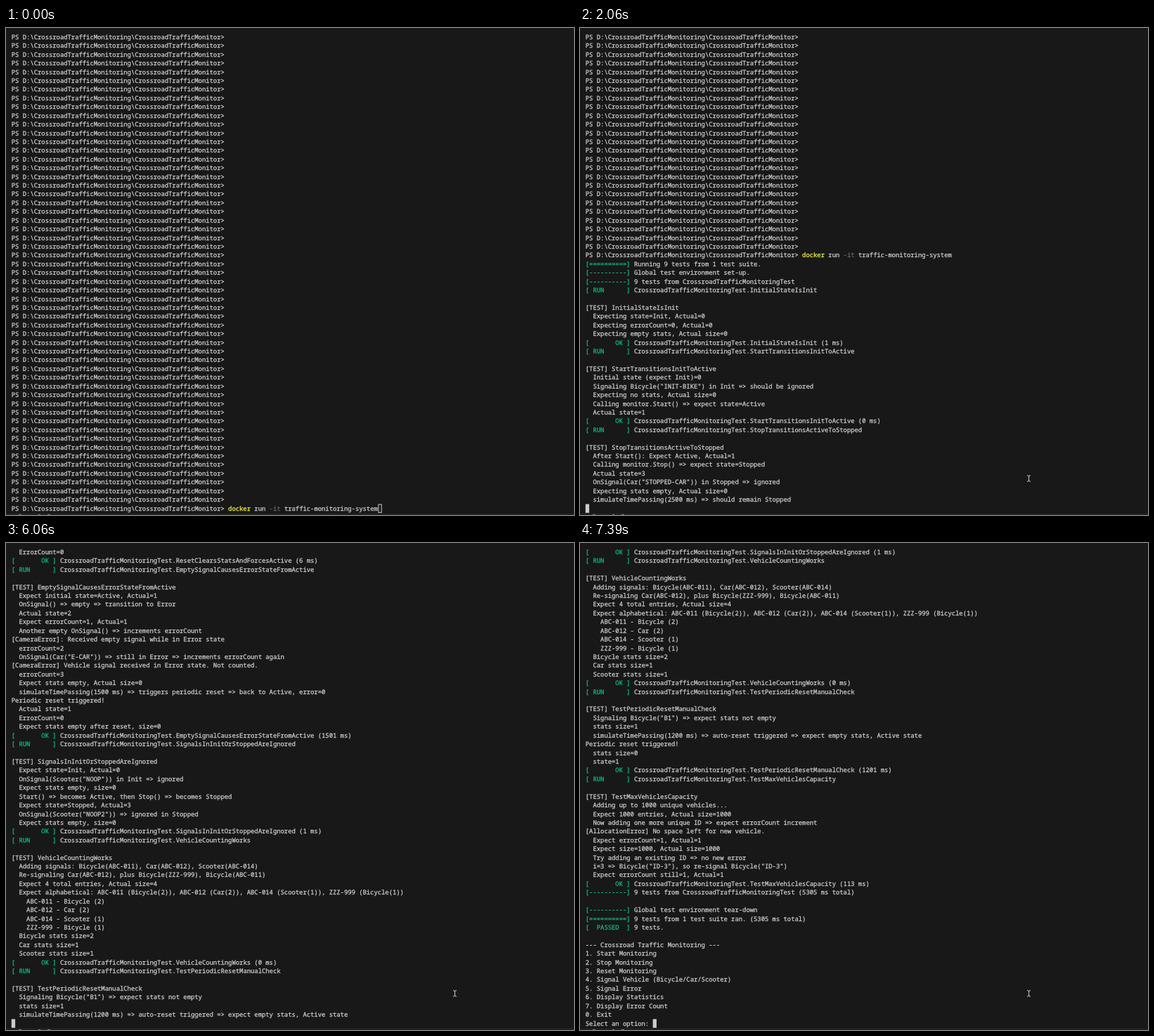
An HTML page that plays this animation: 808 px wide and 693 px high, repeating every 8000 ms.

```html
<!DOCTYPE html>
<html lang="en">
<head>
<meta charset="utf-8">
<title>Terminal session</title>
<style>
html, body { margin: 0; width: 100%; height: 100%; overflow: hidden; background: #181818; }
svg { display: block; }
text {
  font: 8.87px "Noto Sans Mono", "DejaVu Sans Mono", monospace;
  font-variant-ligatures: none;
  white-space: pre;
  text-rendering: geometricPrecision;
}
tspan { fill: currentColor; stroke: currentColor; stroke-width: .28px; }
</style>
</head>
<body>
<svg id="stage" width="808" height="693" viewBox="0 0 808 693">
  <rect width="808" height="693" fill="#181818"/>
  <g id="screen"></g>
  <rect id="cursor"/>
  <path id="mouse" d="M-2 -4H0M1 -4H3M.5 -4V4M-2 4H0M1 4H3" fill="none" stroke="#ccc"/>
  <rect y="691" width="808" height="1" fill="#2b2b2b"/>
  <path d="M18 692.5h4M46 692.5h3M59 692.5h4" stroke="#777"/>
</svg>
<script>
const LOOP = 8000, ROWS = 55, LEFT = 7.8, TOP = 6.8, CHAR = 5.322, LINE = 12.42;
const GREEN = '#0dbc79', YELLOW = '#f5f543', GRAY = '#666', PLAIN = '#ccc';

const prompt = 'PS D:\\CrossroadTrafficMonitoring\\CrossroadTrafficMonitor>';
const command = prompt + ' docker run -it traffic-monitoring-system';
const suite = 'CrossroadTrafficMonitoringTest';

// "@RUN name" and "@OK name" expand to test runner status lines.
const log = `[==========] Running 9 tests from 1 test suite.
[----------] Global test environment set-up.
[----------] 9 tests from ${suite}
@RUN InitialStateIsInit

[TEST] InitialStateIsInit
  Expecting state=Init, Actual=0
  Expecting errorCount=0, Actual=0
  Expecting empty stats, Actual size=0
@OK InitialStateIsInit (1 ms)
@RUN StartTransitionsInitToActive

[TEST] StartTransitionsInitToActive
  Initial state (expect Init)=0
  Signaling Bicycle("INIT-BIKE") in Init => should be ignored
  Expecting no stats, Actual size=0
  Calling monitor.Start() => expect state=Active
  Actual state=1
@OK StartTransitionsInitToActive (0 ms)
@RUN StopTransitionsActiveToStopped

[TEST] StopTransitionsActiveToStopped
  After Start(): Expect Active, Actual=1
  Calling monitor.Stop() => expect state=Stopped
  Actual state=3
  OnSignal(Car("STOPPED-CAR")) in Stopped => ignored
  Expecting stats empty, Actual size=0
  simulateTimePassing(2500 ms) => should remain Stopped
  Actual state=3
@OK StopTransitionsActiveToStopped (2482 ms)
@RUN ResetClearsStatsAndForcesActive

[TEST] ResetClearsStatsAndForcesActive
  Signaling vehicles...
  Expect state=Active, Actual=1
  Stats before Reset, size=2 (expect >0)
  Calling monitor.Reset() => expect state=Active, empty stats, errorCount=0
  Actual state=1
  Stats after Reset, size=0
  ErrorCount=0
@OK ResetClearsStatsAndForcesActive (6 ms)
@RUN EmptySignalCausesErrorStateFromActive

[TEST] EmptySignalCausesErrorStateFromActive
  Expect initial state=Active, Actual=1
  OnSignal() => empty => transition to Error
  Actual state=2
  Expect errorCount=1, Actual=1
  Another empty OnSignal() => increments errorCount
[CameraError]: Received empty signal while in Error state
  errorCount=2
  OnSignal(Car("E-CAR")) => still in Error => increments errorCount again
[CameraError] Vehicle signal received in Error state. Not counted.
  errorCount=3
  Expect stats empty, Actual size=0
  simulateTimePassing(1500 ms) => triggers periodic reset => back to Active, error=0
Periodic reset triggered!
  Actual state=1
  ErrorCount=0
  Expect stats empty after reset, size=0
@OK EmptySignalCausesErrorStateFromActive (1501 ms)
@RUN SignalsInInitOrStoppedAreIgnored

[TEST] SignalsInInitOrStoppedAreIgnored
  Expect state=Init, Actual=0
  OnSignal(Scooter("NOOP")) in Init => ignored
  Expect stats empty, size=0
  Start() => becomes Active, then Stop() => becomes Stopped
  Expect state=Stopped, Actual=3
  OnSignal(Scooter("NOOP2")) => ignored in Stopped
  Expect stats empty, size=0
@OK SignalsInInitOrStoppedAreIgnored (1 ms)
@RUN VehicleCountingWorks

[TEST] VehicleCountingWorks
  Adding signals: Bicycle(ABC-011), Car(ABC-012), Scooter(ABC-014)
  Re-signaling Car(ABC-012), plus Bicycle(ZZZ-999), Bicycle(ABC-011)
  Expect 4 total entries, Actual size=4
  Expect alphabetical: ABC-011 (Bicycle(2)), ABC-012 (Car(2)), ABC-014 (Scooter(1)), ZZZ-999 (Bicycle(1))
    ABC-011 - Bicycle (2)
    ABC-012 - Car (2)
    ABC-014 - Scooter (1)
    ZZZ-999 - Bicycle (1)
  Bicycle stats size=2
  Car stats size=1
  Scooter stats size=1
@OK VehicleCountingWorks (0 ms)
@RUN TestPeriodicResetManualCheck

[TEST] TestPeriodicResetManualCheck
  Signaling Bicycle("B1") => expect stats not empty
  stats size=1
  simulateTimePassing(1200 ms) => auto-reset triggered => expect empty stats, Active state
Periodic reset triggered!
  stats size=0
  state=1
@OK TestPeriodicResetManualCheck (1201 ms)
@RUN TestMaxVehiclesCapacity

[TEST] TestMaxVehiclesCapacity
  Adding up to 1000 unique vehicles...
  Expect 1000 entries, Actual size=1000
  Now adding one more unique ID => expect errorCount increment
[AllocationError] No space left for new vehicle.
  Expect errorCount=1, Actual=1
  Expect size=1000, Actual size=1000
  Try adding an existing ID => no new error
  i=3 => Bicycle("ID-3"), so re-signal Bicycle("ID-3")
  Expect errorCount still=1, Actual=1
@OK TestMaxVehiclesCapacity (113 ms)
[----------] 9 tests from ${suite} (5305 ms total)

[----------] Global test environment tear-down
[==========] 9 tests from 1 test suite ran. (5305 ms total)
[  PASSED  ] 9 tests.

--- Crossroad Traffic Monitoring ---
1. Start Monitoring
2. Stop Monitoring
3. Reset Monitoring
4. Signal Vehicle (Bicycle/Car/Scooter)
5. Signal Error
6. Display Statistics
7. Display Error Count
0. Exit
Select an option: `
  .replace(/^@RUN /gm, `[ RUN      ] ${suite}.`)
  .replace(/^@OK /gm, `[       OK ] ${suite}.`)
  .split('\n');

const lines = [...Array(ROWS - 1).fill(prompt), command, ...log];

// Time, finished lines, and whether the next line is open at the cursor.
const output = [
  [0, 54, true], [870, 55], [2060, 83], [4600, 111],
  [6060, 148], [7260, 156], [7320, 158], [7390, 180, true]
];

// Time and pointer position.
const pointer = [
  [0, -20, -20], [150, 656, 663], [213, 650, 655], [276, 643, 646],
  [340, 639, 641], [480, 643, 636], [550, 638, 641]
];

const byId = id => document.getElementById(id);
const latest = (steps, t) => steps.findLast(s => s[0] <= t);
const svgNode = (tag, parent) =>
  parent.appendChild(document.createElementNS('http://www.w3.org/2000/svg', tag));

function setAttrs(node, attrs) {
  for (const name in attrs) node.setAttribute(name, attrs[name]);
}

const rows = Array.from({ length: ROWS }, (_, i) => {
  const row = svgNode('text', byId('screen'));
  setAttrs(row, { x: LEFT, y: TOP + LINE * i + 9.1 });
  return row;
});

function spans(line) {
  if (line === command) {
    return [[prompt + ' ', PLAIN], ['docker', YELLOW], [' run ', PLAIN], ['-it', GRAY],
      [' traffic-monitoring-system', PLAIN]];
  }
  const [tag] = line.match(/^\[[ =-][^\]]*\]/) || [''];
  return [[tag, GREEN], [line.slice(tag.length), PLAIN]];
}

function write(row, line) {
  row.textContent = '';
  for (const [part, color] of spans(line)) {
    if (!part) continue;
    const span = svgNode('tspan', row);
    span.textContent = part;
    span.style.color = color;
  }
}

let shown;
function drawScreen(state, tail) {
  if (state === shown) return;
  shown = state;
  const count = state[1];
  const view = [...lines.slice(count - ROWS + 1, count), tail];
  rows.forEach((row, i) => write(row, view[i]));
}

// A solid block when focused, otherwise an outline inside the same cell.
function drawCursor(column, focused) {
  const inset = focused ? 0 : .5;
  setAttrs(byId('cursor'), {
    x: LEFT + CHAR * column + inset,
    y: TOP + LINE * (ROWS - 1) + inset,
    width: CHAR - 2 * inset,
    height: LINE - 2 * inset,
    fill: focused ? PLAIN : 'none',
    stroke: focused ? 'none' : PLAIN
  });
}

function render(t) {
  const state = latest(output, t);
  const tail = state[2] ? lines[state[1]] : '';
  drawScreen(state, tail);
  drawCursor(tail.length, t >= 550);
  const [, x, y] = latest(pointer, t);
  byId('mouse').setAttribute('transform', `translate(${x} ${y})`);
}

function tick() {
  render(performance.now() % LOOP);
  requestAnimationFrame(tick);
}
tick();
</script>
</body>
</html>
```
